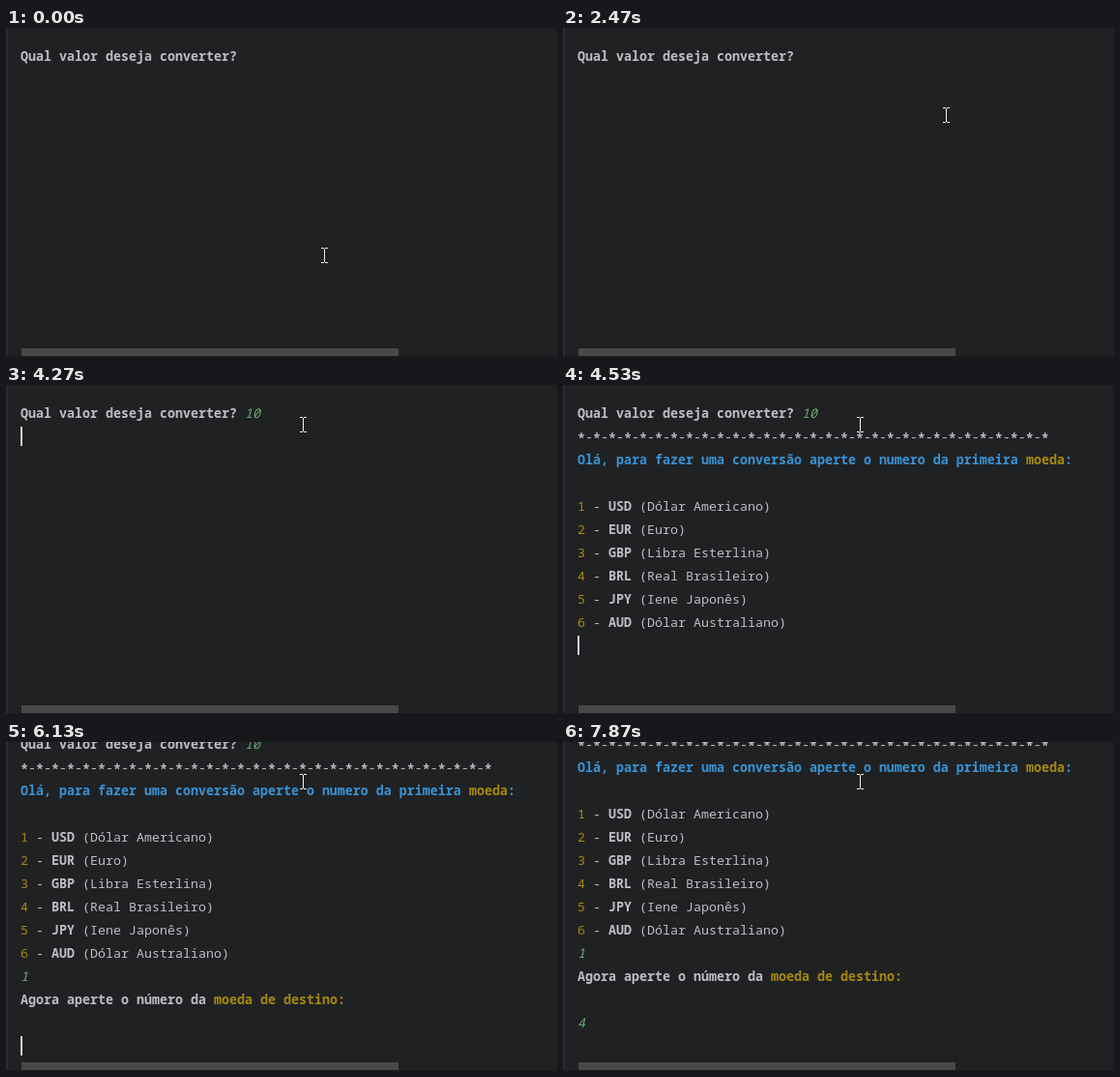
These frames come from a looping animation (570x340 px, 8 s). An HTML page with a canvas:

```html
<!DOCTYPE html>
<html lang="pt">
<head>
<meta charset="utf-8">
<style>
  html, body { margin: 0; width: 100%; height: 100%; overflow: hidden; background: #202123; }
  canvas { display: block; }
</style>
</head>
<body>
<canvas id="stage" width="570" height="340"></canvas>
<script>
const ctx = document.getElementById('stage').getContext('2d');
const LOOP = 8000, LEFT = 15, BASELINE = 34, PITCH = 24, ADVANCE = 8, SIZE = ADVANCE / 0.6;
const FOCUS = 3200, CARET_ON = 800, CARET_OFF = 540, SCROLL_LAG = 60, LAST_LINE = 12;
const GREY = '#bcbec4', BLUE = '#3993d4', GOLD = '#a68a0d', GREEN = '#6aab73';

const plain = (text, color = GREY) => ({ text, color, style: '500' });
const bold = (text, color = GREY) => ({ text, color, style: 'bold' });
const input = text => ({ text, color: GREEN, style: 'italic' });

const currencies = ['USD (Dólar Americano)', 'EUR (Euro)', 'GBP (Libra Esterlina)',
  'BRL (Real Brasileiro)', 'JPY (Iene Japonês)', 'AUD (Dólar Australiano)'];

const menu = [
  plain('*-'.repeat(30) + '*\n'),
  bold('Olá, para fazer uma conversão aperte o numero da primeira ', BLUE),
  bold('moeda', GOLD), bold(':\n\n', BLUE),
  ...currencies.flatMap((name, i) => [
    plain(`${i + 1}`, GOLD), plain(' - '), bold(name.slice(0, 3)), plain(name.slice(3) + '\n')
  ])
];

// Everything the console receives, in order of time
const session = [
  { at: 0, spans: [bold('Qual valor deseja converter? ')] },
  { at: 3600, spans: [input('1')] },
  { at: 3730, spans: [input('0')] },
  { at: 4270, spans: [input('\n')] },
  { at: 4530, spans: menu },
  { at: 5930, spans: [input('1')] },
  { at: 6070, spans: [bold('\nAgora aperte o número da '), bold('moeda de destino:\n\n', GOLD)] },
  { at: 6330, spans: [input('4')] },
  { at: 6870, spans: [input('\n')] }
];

function rect(color, x, y, w, h) {
  ctx.fillStyle = color;
  ctx.fillRect(x, y, w, h);
}

function write(text, line, col, color, style) {
  const x = LEFT + col * ADVANCE, y = BASELINE + line * PITCH;
  const font = `${SIZE}px "Noto Sans Mono", "DejaVu Sans Mono", monospace`;
  ctx.fillStyle = color;
  ctx.font = `${style} ${font}`;
  ctx.fillText(text.replace(/\*/g, ' '), x, y);
  // Asterisks sit at the height of the hyphens
  ctx.font = `bold ${font}`;
  ctx.fillText(text.replace(/[^*]/g, ' '), x, y + 2);
}

// Calls put for each piece of text received by time t; returns the caret's place
function play(t, put = () => {}) {
  let line = 0, col = 0, last = 0;
  for (const { at, spans } of session.filter(e => e.at <= t)) {
    last = at;
    for (const { text, color, style } of spans) {
      text.split('\n').forEach((part, i) => {
        if (i) { line++; col = 0; }
        put(part, line, col, color, style);
        col += part.length;
      });
    }
  }
  return { line, col, last };
}

function scrollAt(t) {
  const { line } = play(t - SCROLL_LAG);
  return line > LAST_LINE ? (line - LAST_LINE) * PITCH + 3 : 0;
}

function drawCaret(t, { line, col, last }, scroll) {
  const age = t - Math.max(last, FOCUS);
  if (age < 0 || age % (CARET_ON + CARET_OFF) >= CARET_ON) return;
  const x = Math.max(LEFT, LEFT + col * ADVANCE - 1);
  rect('#ced0d6', x, 19 + line * PITCH - scroll, 2, 20);
}

const curve = (a, b, c, u) => Math.round(a * (1 - u) ** 2 + 2 * b * u * (1 - u) + c * u * u);

// The pointer leaves the console, then comes back in a hooked sweep
function pointerAt(t) {
  if (t < 270) {
    const u = Math.ceil((t - 69) / 67) / 3;
    const v = Math.min(1, Math.max(0, u));
    return [curve(329, 337, 362, v), curve(235, 222, 270, v)];
  }
  if (t < 2470) return null;
  const u = Math.min(1, Math.floor((t - 2470) / 82) / 4);
  return [curve(396, 276, 307, u), curve(90, -12, 41, u)];
}

function drawPointer([x, y]) {
  rect('#f0f0f0', x, y - 7, 1, 14);
  for (const row of [y - 8, y + 7]) {
    ctx.fillRect(x - 3, row, 3, 1);
    ctx.fillRect(x + 1, row, 3, 1);
  }
}

function draw(t) {
  rect('#202123', 0, 0, 570, 340);
  rect('#2b2c2f', 0, 0, 2, 340);

  const scroll = scrollAt(t);
  ctx.save();
  ctx.translate(0, -scroll);
  const caret = play(t, write);
  ctx.restore();

  rect('#474849', 16, 331, 390, 8);
  rect('#25191e', 0, 339, 570, 1);
  drawCaret(t, caret, scroll);
  const pointer = pointerAt(t);
  if (pointer) drawPointer(pointer);
}

const begin = performance.now();
function tick() {
  draw((performance.now() - begin) % LOOP);
  requestAnimationFrame(tick);
}
tick();
</script>
</body>
</html>
```
